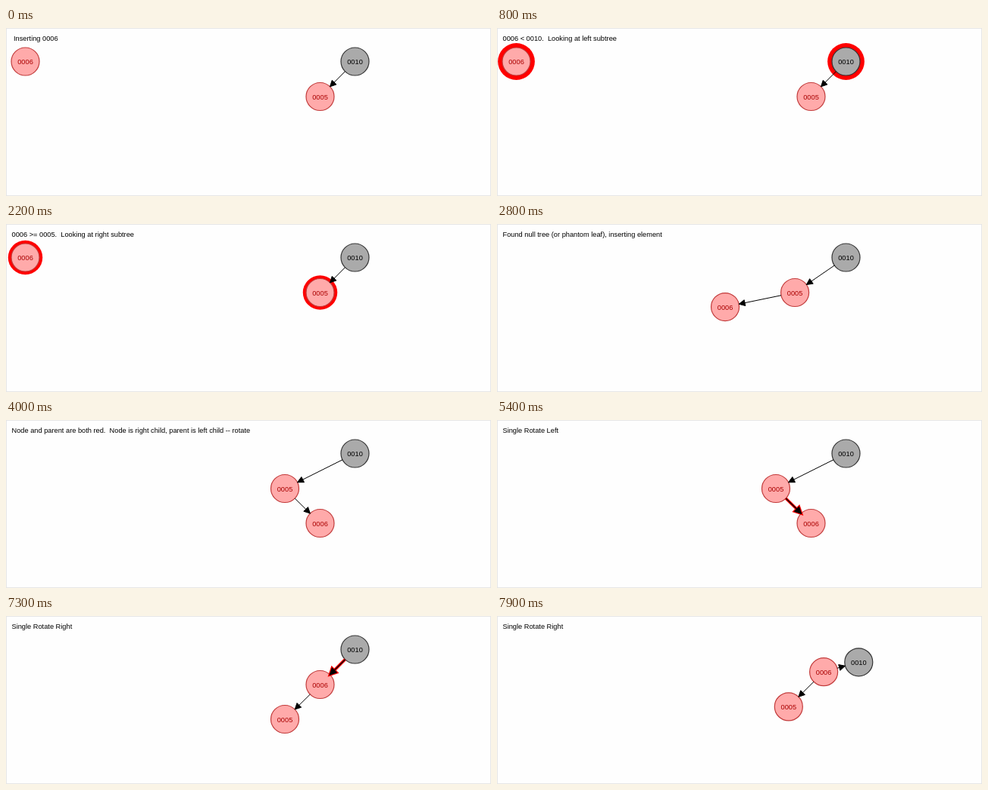
These frames come from a looping animation (640x223 px, 8 s). An HTML page with a canvas:

```html
<!DOCTYPE html>
<html lang="en">
<head>
<meta charset="utf-8">
<title>Red-black tree insertion</title>
<style>
  html, body { margin: 0; width: 100%; height: 100%; overflow: hidden; background: #fefefe; }
  canvas { display: block; }
</style>
</head>
<body>
<canvas id="stage" width="640" height="223"></canvas>
<script>
const ctx = document.getElementById('stage').getContext('2d');
const LOOP = 8000, TICK = 100, R = 18.5;
const FONT = '9.25px "Liberation Sans", Arial, sans-serif';
const RED = { fill: '#ffaaaa', line: '#c23a3a', text: '#aa0000' };
const BLACK = { fill: '#aaaaaa', line: '#333333', text: '#000000' };

// Tree slots
const ROOT = [460.5, 44.5], LEFT = [414.5, 91], RIGHT = [507, 91];
const OUTER = [368, 91], DEEP = [368, 137], INNER = [414.5, 137], ENTRY = [25.5, 44.5];

const messages = [
  [0, 'Inserting 0006'],
  [300, '0006 < 0010.  Looking at left subtree'],
  [1760, '0006 >= 0005.  Looking at right subtree'],
  [2430, 'Found null tree (or phantom leaf), inserting element'],
  [4000, 'Node and parent are both red.  Node is right child, parent is left child -- rotate'],
  [4700, 'Single Rotate Left'],
  [6200, 'Node and parent are both red.  Node is left child, parent is left child\nCan fix extra redness with a single rotation'],
  [7000, 'Single Rotate Right']
];

const clamp = v => Math.min(1, Math.max(0, v));
const ramp = (t, from, to) => clamp((t - from) / (to - from));
const mix = (a, b, p) => [a[0] + (b[0] - a[0]) * p, a[1] + (b[1] - a[1]) * p];
const within = (t, from, to) => t >= from && t < to;

// Triangle wave for the highlight ring
function pulse(t) {
  const phase = Math.abs(t - 950) % 1800;
  return 6.5 - 3.7 * (1 - Math.abs(phase - 900) / 900);
}

function insertion(t) {
  if (t < 2800) return 0.46 * ramp(t, 2430, 2800);
  if (t < 2900) return 0.46 + 0.18 * ramp(t, 2800, 2900);
  return 0.64 + 0.36 * ramp(t, 2900, 3200);
}

function disc([x, y], r) {
  ctx.beginPath();
  ctx.arc(x, y, r, 0, Math.PI * 2);
}

function node(pos, label, style, ring) {
  if (ring) {
    disc(pos, R + ring);
    ctx.fillStyle = '#ff0000';
    ctx.fill();
  }
  disc(pos, R);
  ctx.fillStyle = style.fill;
  ctx.fill();
  ctx.strokeStyle = style.line;
  ctx.lineWidth = 1.2;
  ctx.stroke();
  ctx.fillStyle = style.text;
  ctx.textAlign = 'center';
  ctx.fillText(label, pos[0], pos[1] + 3.6);
}

function arrow(from, to, color, width) {
  const dx = to[0] - from[0], dy = to[1] - from[1], d = Math.hypot(dx, dy);
  const ux = dx / d, uy = dy / d;
  const tip = [to[0] - ux * R, to[1] - uy * R];
  const base = [tip[0] - ux * 8, tip[1] - uy * 8];
  ctx.strokeStyle = ctx.fillStyle = color;
  ctx.lineWidth = width;
  ctx.beginPath();
  ctx.moveTo(from[0] + ux * R, from[1] + uy * R);
  ctx.lineTo(...tip);
  ctx.stroke();
  ctx.beginPath();
  ctx.moveTo(...tip);
  ctx.lineTo(base[0] - uy * 4, base[1] + ux * 4);
  ctx.lineTo(base[0] + uy * 4, base[1] - ux * 4);
  ctx.closePath();
  ctx.fill();
  ctx.stroke();
}

function edge(from, to, glow) {
  if (glow) arrow(from, to, '#ff0000', glow);
  arrow(from, to, '#000000', glow ? 1.4 : 1);
}

function message(t) {
  const text = messages.filter(m => m[0] <= t).pop()[1];
  ctx.fillStyle = '#000000';
  ctx.textAlign = 'left';
  text.split('\n').forEach((line, i) => ctx.fillText(line, t < 300 ? 10 : 7.5, 16.8 + i * 11));
}

function draw(t) {
  const add = insertion(t);
  const turnLeft = ramp(t, 5420, 6200);
  const turnRight = ramp(t, 7620, 8395);

  let five = mix(LEFT, OUTER, add);
  let six = mix(ENTRY, INNER, 1 - (1 - add) ** 2);
  if (turnLeft) {
    five = mix(OUTER, DEEP, turnLeft);
    six = mix(INNER, LEFT, turnLeft);
  }
  if (turnRight) {
    five = mix(DEEP, LEFT, turnRight);
    six = mix(LEFT, ROOT, turnRight);
  }
  const ten = mix(ROOT, RIGHT, turnRight);

  ctx.fillStyle = '#fefefe';
  ctx.fillRect(0, 0, 640, 223);
  ctx.strokeStyle = '#e6e6e6';
  ctx.lineWidth = 1;
  ctx.strokeRect(0.5, 0.5, 639, 222);
  ctx.font = FONT;

  const first = within(t, 300, 950), second = within(t, 1760, 2430);
  const ring = pulse(t), glow = 3.2 + 0.2 * ring;
  node(ten, '0010', BLACK, first && ring);
  node(five, '0005', RED, second && ring);
  node(six, '0006', RED, (first || second) && ring);

  if (within(t, 950, 1760)) {
    disc(mix(ROOT, LEFT, ramp(t, 950, 1760)), R);
    ctx.strokeStyle = '#007700';
    ctx.lineWidth = 3.7;
    ctx.stroke();
  }

  if (t < 5420) {
    edge(ten, five);
    if (t >= 2430) edge(five, six, within(t, 4700, 5420) && glow);
  } else {
    edge(six, five);
    if (turnRight) edge(six, ten);
    else edge(ten, six, t >= 7000 && glow);
  }
  message(t);
}

const start = performance.now();
function frame() {
  const t = (performance.now() - start) % LOOP;
  draw(Math.floor(t / TICK) * TICK);
  requestAnimationFrame(frame);
}
frame();
</script>
</body>
</html>
```
